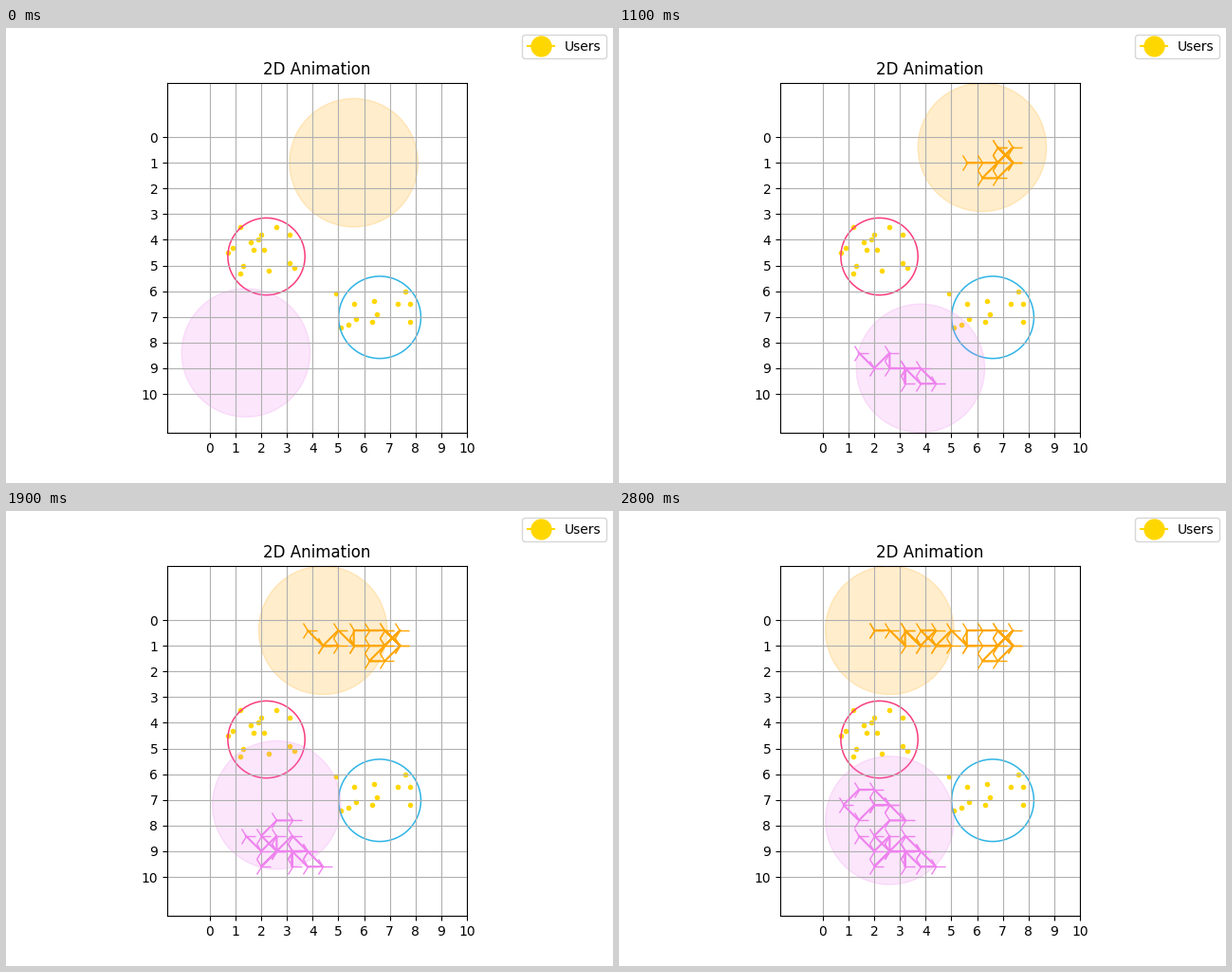
These frames come from a looping animation (640 px wide and 480 px high, 2900 ms). A matplotlib script:

```python
import numpy as np
import matplotlib.pyplot as plt
from matplotlib.animation import FuncAnimation
from matplotlib.lines import Line2D
from matplotlib.patches import Circle

FRAMES, INTERVAL = 29, 100
STEP, REACH = 0.6, 2.5

# y grows downwards; "-" means staying in place
HEADINGS = {"N": (0, -1), "S": (0, 1), "E": (1, 0), "W": (-1, 0),
            "NE": (1, -1), "NW": (-1, -1), "SE": (1, 1), "SW": (-1, 1), "-": (0, 0)}

USERS = [(1.2, 3.5), (2.6, 3.5), (2.0, 3.8), (3.1, 3.8), (1.9, 4.0), (1.6, 4.1),
         (0.9, 4.3), (1.7, 4.4), (2.1, 4.4), (0.7, 4.5), (3.1, 4.9), (3.3, 5.1),
         (1.3, 5.0), (2.3, 5.2), (1.2, 5.3),
         (4.9, 6.1), (7.6, 6.0), (5.6, 6.5), (6.4, 6.4), (7.3, 6.5), (7.8, 6.5),
         (6.5, 6.9), (5.7, 7.1), (6.3, 7.2), (7.8, 7.2), (5.4, 7.3), (5.1, 7.4)]


def walk(start, moves):
    """Positions visited from start, one per frame."""
    steps = [(0, 0)] + [HEADINGS[m] for m in moves.split()]
    return np.array(start) + STEP * np.cumsum(steps, axis=0)


class Walker:
    """A moving coverage disc that leaves a marked trail behind it."""

    def __init__(self, ax, color, start, moves):
        self.path = walk(start, moves)
        self.disc = ax.add_patch(Circle(start, REACH, color=color, alpha=0.2))
        self.trail, = ax.plot([], [], color=color, marker="4", markersize=15)

    def show(self, i):
        self.disc.center = tuple(self.path[i])
        self.trail.set_data(*self.path[:i].T)
        return self.disc, self.trail


fig, ax = plt.subplots(figsize=(6.4, 4.8), dpi=100)
ax.set_title("2D Animation")
ax.set_aspect("equal")
ax.set_xticks(range(11))
ax.set_yticks(range(11))
ax.grid(True)

ax.scatter(*zip(*USERS), s=16, color="gold", linewidths=0, zorder=1)
for center, radius, color in [((2.2, 4.65), 1.5, "#fa3c7c"),
                              ((6.61, 7.02), 1.6, "#2fb4e5")]:
    ax.add_patch(Circle(center, radius, fill=False, edgecolor=color, linewidth=1.1))

walkers = [
    Walker(ax, "orange", (5.6, 1.0),
           "E E NE SW SW E NE NW SE NW W W S NW "
           "SW E W NW E SW NW SE NW S NW W - E"),
    Walker(ax, "violet", (1.4, 8.4),
           "SE NE S E S N SE E NW W E NW SW SW "
           "NE NW NE E NW W - E NW W SW SE NE SE"),
]

ax.set_xlim(-1.655, 10)
ax.set_ylim(11.52, -2.12)
fig.legend(handles=[Line2D([0], [0], color="gold", marker="o",
                           markersize=15, label="Users")])


def update(i):
    return [artist for w in walkers for artist in w.show(i)]


anim = FuncAnimation(fig, update, frames=FRAMES, interval=INTERVAL,
                     init_func=lambda: update(0), repeat=True, repeat_delay=0)
plt.show()
```
